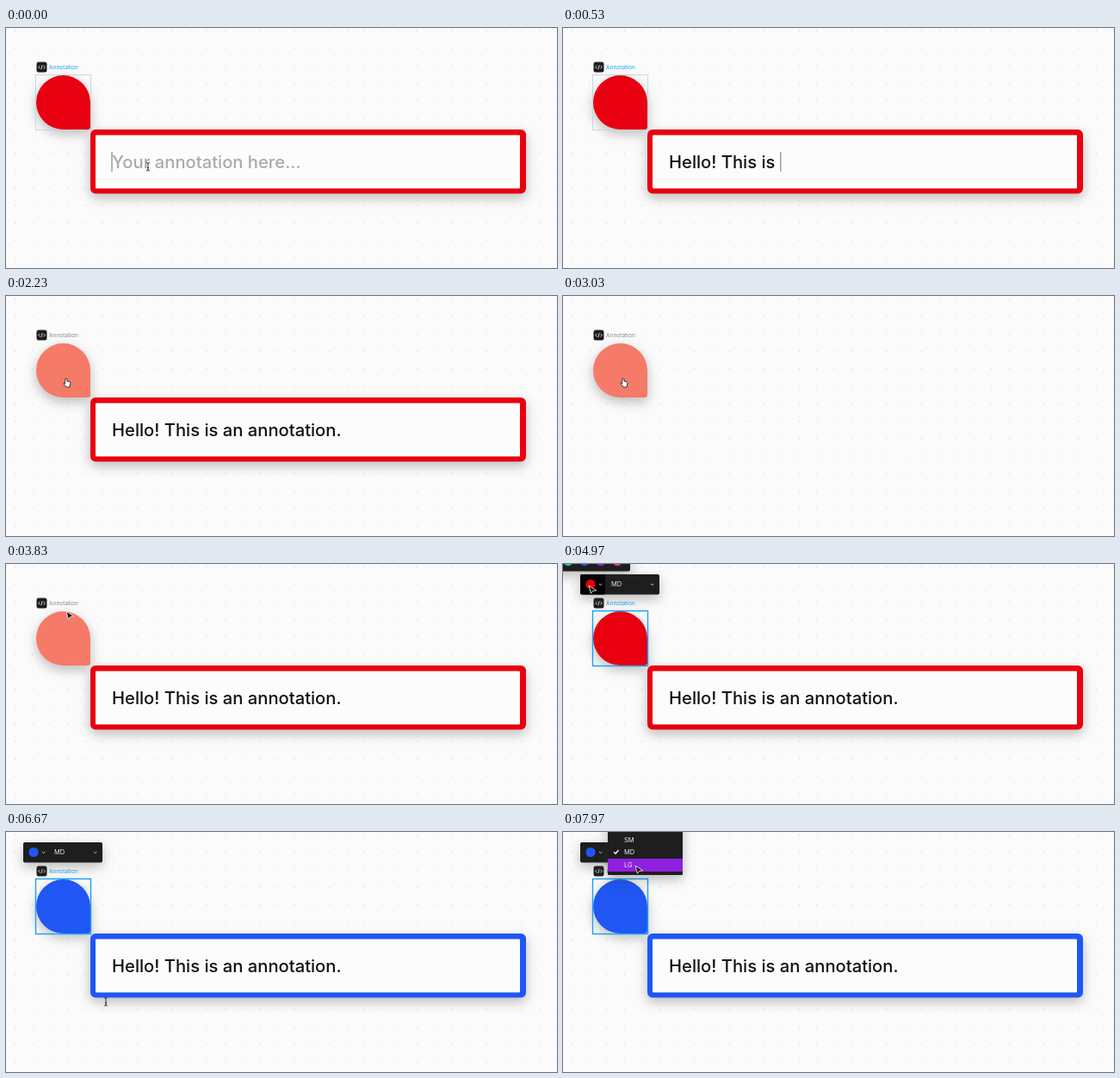
Animation, 640 px wide and 279 px high, one loop 8 s. Source, as an HTML page:

```html
<!DOCTYPE html>
<html lang="en">
<head>
<meta charset="utf-8">
<title>Annotation widget</title>
<style>
  html, body { margin: 0; width: 100%; height: 100%; overflow: hidden; background: #fbfbfb; }
  svg { display: block; width: 100%; height: 100%; }
  text { font-family: Inter, Arial, sans-serif; white-space: pre; }
  .shadow { filter: drop-shadow(0 5px 7px rgba(50, 50, 50, .32)); }
  .line { fill: none; stroke: #c8c8c8; stroke-width: 1; }
  .menu { font-size: 7.5px; fill: #eee; }
</style>
</head>
<body>
<svg viewBox="0 0 640 279" preserveAspectRatio="none">
  <defs>
    <pattern id="dots" x="0.4" y="-6.7" width="20.3" height="20.3" patternUnits="userSpaceOnUse">
      <circle cx="10.15" cy="10.15" r=".75" fill="#d8d8d8"/>
    </pattern>
  </defs>
  <rect width="640" height="279" fill="#fbfbfb"/>
  <rect width="640" height="279" fill="url(#dots)"/>

  <path id="pin" class="shadow" d="M66.5 55A31.5 31.5 0 1 0 66.5 118H94.5Q98 118 98 114.5V86.5A31.5 31.5 0 0 0 66.5 55Z"/>
  <rect id="outline" x="34.5" y="54.5" width="64" height="64" fill="none"/>

  <g id="note">
    <rect id="frame" class="shadow" x="98" y="118" width="506" height="74.5" rx="6"/>
    <rect x="104" y="124.5" width="493" height="62" rx="1" fill="#fcfcfc"/>
    <text id="words" x="123" y="162.5" font-size="20.2" font-weight="500"></text>
    <path id="caret" stroke="#888" stroke-width="1.2" d="M0 144V167"/>
  </g>

  <g id="label">
    <rect x="35.5" y="39.5" width="12" height="12" rx="2.5" fill="#1e1e1e"/>
    <path d="M39.4 43.9L37.7 45.6L39.4 47.3M43.6 43.9L45.3 45.6L43.6 47.3M42.2 43.2L40.8 48" fill="none" stroke="#fff" stroke-width=".8"/>
    <text id="name" x="50" y="48.2" font-size="6.6">Annotation</text>
  </g>

  <g id="toolbar">
    <rect class="shadow" x="20" y="12" width="92" height="23.5" rx="2" fill="#1e1e1e"/>
    <rect id="active" x="20" y="12" width="29" height="23.5" rx="2" fill="#000"/>
    <circle id="swatch" cx="32" cy="23.5" r="5.6"/>
    <path class="line" d="M42 23L43.7 24.6L45.4 23M102 23L103.7 24.6L105.4 23"/>
    <text class="menu" x="56" y="26.2">MD</text>
  </g>

  <g id="palette">
    <rect class="shadow" x="-30" y="-20" width="108" height="28.5" rx="2" fill="#1e1e1e"/>
    <circle cx="6" cy="-3.5" r="5.8" fill="#20c8a0"/>
    <circle cx="25" cy="-3.5" r="5.8" fill="#2056f4"/>
    <circle cx="44" cy="-3.5" r="5.8" fill="#9020e0"/>
    <circle cx="63" cy="-3.5" r="5.8" fill="#e830a0"/>
  </g>

  <g id="sizes">
    <rect class="shadow" x="52" y="-20" width="87" height="70" rx="1" fill="#1e1e1e"/>
    <rect id="row" x="52" width="87" height="15" fill="#9020e0"/>
    <path d="M59 23.3L61 25.2L64.5 21" fill="none" stroke="#fff" stroke-width="1.3"/>
    <text class="menu" x="71" y="11.7">SM</text>
    <text class="menu" x="71" y="26.2">MD</text>
    <text class="menu" x="71" y="40.7">LG</text>
  </g>

  <g id="cursor">
    <path id="arrow" d="M0 0L2.4 9.2L4.6 6.4L8.6 5.8Z" fill="#111" stroke="#fff" stroke-width=".8"/>
    <path id="beam" d="M-2 -4.5Q0 -4.5 0 -3Q0 -4.5 2 -4.5M0 -3V4M-2 5Q0 5 0 3.5Q0 5 2 5M-1 1.5H1" fill="none" stroke="#333" stroke-width="1"/>
    <path id="hand" d="M-1.2 -3.6Q0 -4.8 1 -3.6V-1L4 -.2Q5 .2 4.8 1.4L4 6H0L-3 2Q-3.4 .6 -1.2 1.6Z" fill="#fff" stroke="#222" stroke-width=".9"/>
  </g>
</svg>
<script>
const LOOP = 8000;
const MESSAGE = 'Hello! This is an annotation.';
const HINT = 'Your annotation here...';
const RED = ['#e80010', '#f57a68'], BLUE = ['#2056f4', '#7898f8'];

// Pointer stops: time, x, y
const STOPS = [
  [0, 165, 161], [1020, 165, 161], [1300, 174, 236], [1700, 174, 236],
  [2180, 70, 100], [3560, 70, 100], [3830, 70, 55], [4020, 66, 46],
  [4300, 66, 46], [4800, 30, 25], [5150, 30, 25], [5650, 25, 1],
  [5950, 25, 1], [6550, 116, 197], [6750, 116, 197], [7200, 85, 25],
  [7730, 85, 25], [7960, 84, 39], [8000, 84, 39]
];

const $ = id => document.getElementById(id);
const set = (id, attrs) => {
  for (const key in attrs) $(id).setAttribute(key, attrs[key]);
};
const show = (id, on) => set(id, { visibility: on ? 'visible' : 'hidden' });
const within = (t, from, to) => t >= from && t < to;

function pointer(t) {
  const i = STOPS.findIndex(s => s[0] > t);
  const [t0, x0, y0] = STOPS[i - 1], [t1, x1, y1] = STOPS[i];
  const u = (t - t0) / (t1 - t0), e = u * u * (3 - 2 * u);
  return [x0 + (x1 - x0) * e, y0 + (y1 - y0) * e];
}

function draw(t) {
  const [x, y] = pointer(t);
  const reach = Math.hypot(x - 66.5, y - 86.5);
  const hover = reach < 34;
  const editing = t < 1340;
  const selected = editing || t >= 4150;
  const noteOpen = !within(t, 2400, 3480);
  const overNote = noteOpen && x > 98 && y > 118 && y < 200;
  const [base, light] = t < 5860 ? RED : BLUE;

  set('pin', { fill: hover ? light : base });
  set('frame', { fill: base });
  set('swatch', { fill: base });
  show('outline', selected);
  set('outline', {
    stroke: editing ? '#b4d4e4' : '#18a0fb',
    'stroke-width': editing ? .8 : 1.4
  });
  show('label', selected || overNote || reach < 42);
  set('name', { fill: selected ? '#18a0fb' : '#888' });

  const typed = MESSAGE.slice(0, Math.max(0, Math.floor((t - 20) / 33)));
  $('words').textContent = typed || HINT;
  set('words', { fill: typed ? '#111' : '#aaa' });
  show('note', noteOpen);
  show('caret', editing);
  const end = typed ? $('words').getComputedTextLength() + 1 : 0;
  set('caret', { transform: `translate(${123 + end} 0)` });

  const sizesOpen = t >= 7300;
  show('toolbar', t >= 4150);
  show('active', within(t, 4780, 5860));
  show('palette', within(t, 4960, 5860));
  show('sizes', sizesOpen);
  show('row', sizesOpen);
  set('row', { y: y < 31 ? 16 : 31 });

  // The pointer hides while keys are pressed
  const typing = within(t, 53, 1020);
  const hand = reach < 30;
  set('cursor', { transform: `translate(${x} ${y})` });
  show('hand', hand);
  show('beam', overNote && !typing);
  show('arrow', !hand && !overNote);
}

function tick() {
  draw(performance.now() % LOOP);
  requestAnimationFrame(tick);
}
tick();
</script>
</body>
</html>
```
